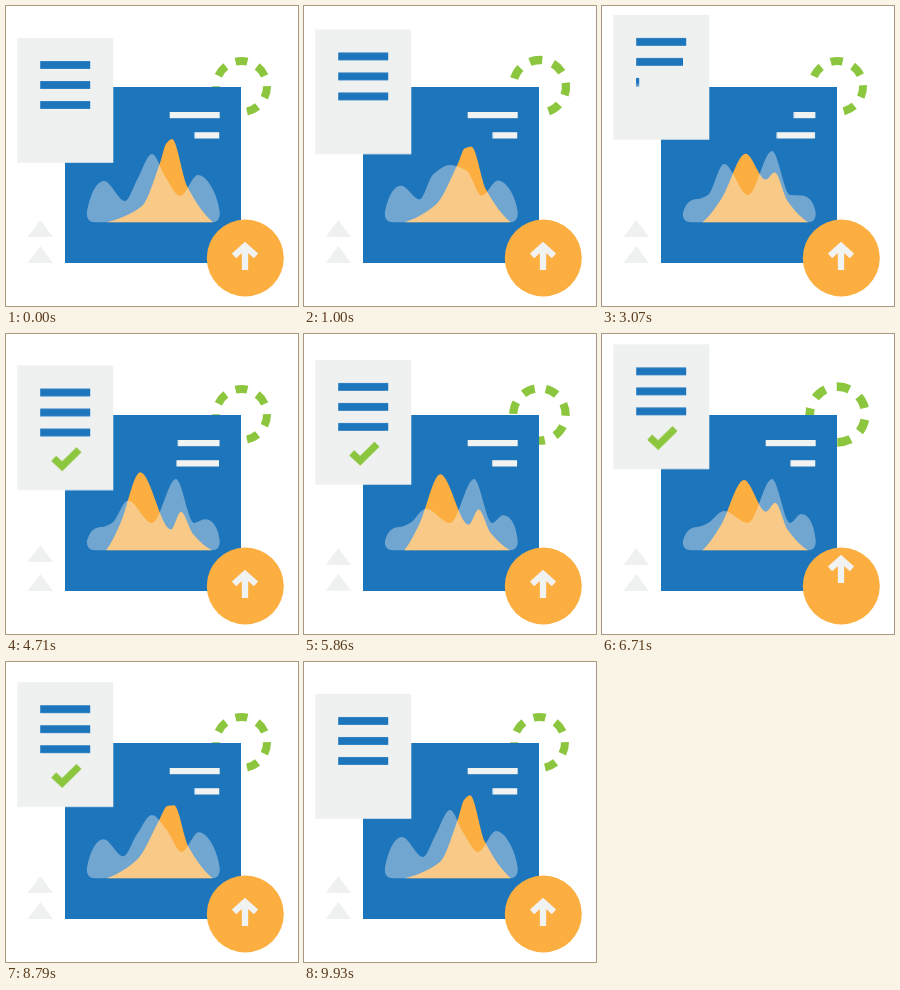
Write an HTML page that moves like this. It is 292 px wide and 300 px high and loops after 10 s.

```html
<!DOCTYPE html>
<html lang="en">
<head>
<meta charset="utf-8">
<title>Report illustration</title>
<style>
html, body { margin: 0; width: 100%; height: 100%; overflow: hidden; background: #fff; }
svg { display: block; width: 292px; height: 300px; }
svg * { animation: 10s cubic-bezier(.37, 0, .63, 1) infinite; }

.blue { fill: #1d75bc; }
.pale { fill: #eff1f1; }
.orange { fill: #fcaf40; }
.bar { fill: #f1f2f2; transform-origin: 213.5px 0; }
.stroke { fill: none; stroke-width: 6.3; }

.ring { transform-origin: 235.5px 80.5px; animation-name: spin, swell; }
.ring circle { fill: none; stroke: #8cc63e; stroke-width: 8; stroke-dasharray: .525 .475; }
@keyframes spin {
  0%, 3.5% { rotate: 0deg; }
  32%, 53.5% { rotate: 360deg; }
  82%, 100% { rotate: 720deg; }
}
@keyframes swell {
  0%, 3.5%, 32%, 53.5%, 82%, 100% { scale: 1; }
  17.5%, 67.5% { scale: 1.09; }
}

.paper { animation-name: lift; animation-timing-function: cubic-bezier(.5, 0, .5, 1); }
@keyframes lift {
  0%, 50%, 100% { translate: 0 0; }
  24%, 25%, 74%, 75% { translate: 0 -25.3px; }
}
.line { transform-origin: 34px 0; animation-name: retype; }
@keyframes retype {
  0%, 15.5%, 29.2%, 100% { transform: scaleX(1); }
  18.5%, 26.2% { transform: scaleX(0); }
}
.check { stroke: #8cc63e; stroke-width: 7.2; stroke-dasharray: 1 2; animation-name: tick; }
@keyframes tick {
  0%, 35% { stroke-dashoffset: 1.1; }
  40%, 90% { stroke-dashoffset: 0; }
  94%, 100% { stroke-dashoffset: 1.1; }
}

.top { animation-name: top; }
@keyframes top {
  0%, 15%, 54%, 100% { transform: scaleX(1); }
  30%, 35% { transform: scaleX(.44); }
}
.low { animation-name: low; }
@keyframes low {
  0%, 20%, 60%, 100% { transform: scaleX(.5); }
  40% { transform: scaleX(1); }
}

.tri { animation-name: hop; }
@keyframes hop {
  0%, 45.6%, 57.6%, 73%, 85%, 100% { translate: 0 0; }
  51.6%, 79% { translate: 0 -20px; }
}

.badge { transform-origin: 239.5px 252px; animation-name: pulse; }
@keyframes pulse {
  0%, 21.4%, 24.8%, 39%, 46.8%, 71.4%, 74.8%, 100% { scale: 1; }
  23.1%, 73.1% { scale: .96; }
  42.9% { scale: 1.1; }
}
.arrow { stroke: #f1f2f2; animation-name: nudge; }
@keyframes nudge {
  0%, 14.4%, 19.2%, 64.4%, 69.2%, 100% { translate: 0 0; }
  17%, 67% { translate: 0 -15px; }
}
</style>
</head>
<body>
<svg viewBox="0 0 292 300">
  <g class="ring"><circle cx="235.5" cy="80.5" r="25.5" pathLength="7" transform="rotate(-103.5 235.5 80.5)"/></g>

  <path class="pale tri" d="M34.3 214 47 231H21.6Z"/>
  <path class="pale tri" style="animation-delay:.15s" d="M34.3 240 47 257H21.6Z"/>

  <rect class="blue" x="59" y="81" width="176" height="176"/>
  <rect class="bar top" x="163.7" y="106" width="50" height="6.2"/>
  <rect class="bar low" x="163.5" y="126.2" width="49.5" height="6.3"/>
  <path id="peak" class="orange"/>
  <path id="haze" class="pale" opacity=".4"/>

  <g class="paper">
    <rect class="pale" x="11.3" y="32" width="96" height="124.8"/>
    <rect class="blue line" x="34.2" y="55.1" width="50" height="7.8"/>
    <rect class="blue line" style="animation-delay:.2s" x="34.2" y="75.1" width="50" height="7.8"/>
    <rect class="blue line" style="animation-delay:.4s" x="34.2" y="95.1" width="50" height="7.8"/>
    <path class="stroke check" pathLength="1" d="M47.7 124.8 56.2 132.8 73 116.3"/>
  </g>

  <g class="badge">
    <circle class="orange" cx="239.3" cy="252" r="38.5"/>
    <path class="stroke arrow" d="M228 249.8 239 240 250 249.8M239 241V264"/>
  </g>
</svg>
<script>
const LOOP = 10000, BASE = 216.3, SIDE = 207.5;
const haze = document.getElementById('haze');
const peak = document.getElementById('peak');
const start = performance.now();

const mix = (a, b, k) => a + (b - a) * k;
const blend = (p, q, k) => p.map(([x, y], i) => [mix(x, q[i][0], k), mix(y, q[i][1], k)]);
const ease = (t, from, to) => {
  const p = Math.min(1, Math.max(0, (t - from) / (to - from)));
  return .5 - .5 * Math.cos(Math.PI * p);
};

// Smooth line through points: flat at extremes, so it never overshoots
function curve(pts, endSlope) {
  const d = pts.slice(1).map(([x, y], i) => (y - pts[i][1]) / (x - pts[i][0]));
  const m = pts.map((_, i) => {
    if (i === 0) return d[0] * endSlope;
    if (i === d.length) return d[i - 1] * endSlope;
    const a = d[i - 1], b = d[i];
    return a * b <= 0 ? 0 : 2 * a * b / (a + b);
  });
  return pts.slice(1).map(([x, y], i) => {
    const [px, py] = pts[i], w = (x - px) / 3;
    return `C${px + w} ${py + w * m[i]} ${x - w} ${y - w * m[i + 1]} ${x} ${y}`;
  }).join('');
}

// Three even humps turn into a tall one; the second then sinks as the last rises
function hazePath(t) {
  const calm = [[98, 175], [119, 195], [132, 172], [146, 148], [160, 172], [174, 190], [192, 169]];
  const shift = ease(t, 3000, 6700);
  const tall = [[95, 193], [106, 189], [122, mix(158, 177, shift)], [146, 189],
    [170, 145], [188, 189], [199, mix(189.5, 180, shift)]];
  const pts = blend(calm, tall, ease(t, 0, 2900) - ease(t, 6700, 9400));
  const [ax, ay] = pts[0], [zx, zy] = pts[pts.length - 1];
  return `M89 ${BASE}Q80.5 216 80.8 ${SIDE}C82 ${mix(SIDE, ay, .3)} ${ax - 10} ${ay} ${ax} ${ay}` +
    curve(pts, 0) +
    `C${zx + 10} ${zy} 213 ${mix(SIDE, zy, .4)} 213.8 ${SIDE}Q214 216 206 ${BASE}Z`;
}

// One summit splits in two and closes again
function peakPath(t) {
  const split = Math.sin(Math.PI * t / LOOP) ** 1.5;
  const bow = 4 * split * (1 - split);
  const single = [[101, BASE], [136, 200], [154, 157], [160, 138], [166, 133], [181, 180], [207, BASE]];
  const double = [[100, BASE], [114, 190], [134, 138], [165, 196], [175, 178], [187, 200], [206, BASE]];
  const pts = blend(single, double, split);
  const [, , summit, dip] = pts;
  summit[0] += 6 * bow;
  summit[1] += 6.5 * bow;
  dip[1] -= 10 * bow;
  return `M${pts[0]}` + curve(pts, .6) + 'Z';
}

function draw() {
  const t = (performance.now() - start) % LOOP;
  haze.setAttribute('d', hazePath(t));
  peak.setAttribute('d', peakPath(t));
  requestAnimationFrame(draw);
}
draw();
</script>
</body>
</html>
```
